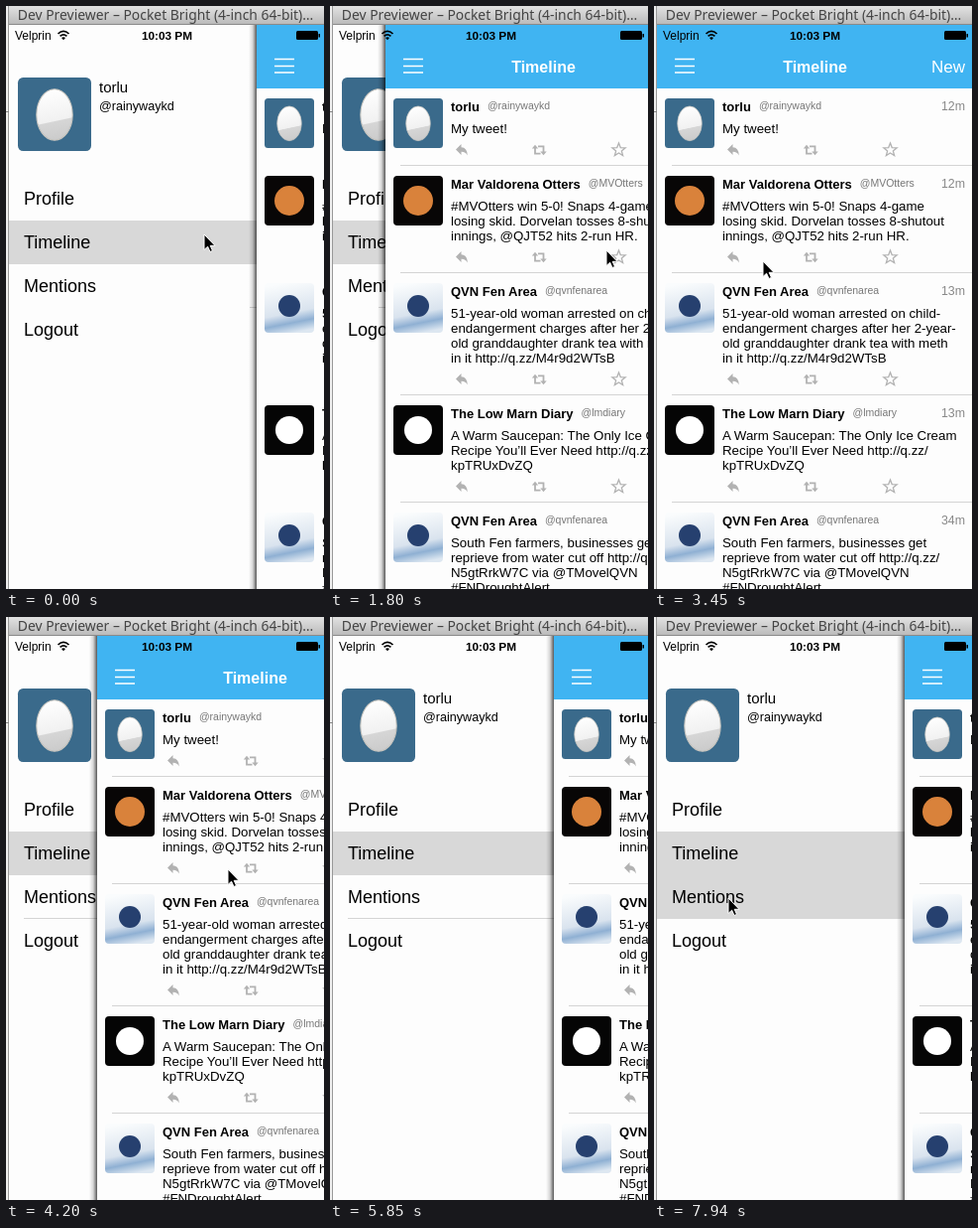
Animation of 321 by 587 pixels, one loop 8 s. Source, as an HTML page:

```html
<!DOCTYPE html>
<html lang="en">
<head>
<meta charset="utf-8">
<style>
  html, body { margin: 0; width: 100%; height: 100%; overflow: hidden; background: #fff; }
  svg { display: block; width: 100vw; height: 100vh; font-family: "Liberation Sans", Arial, sans-serif; }
  .title { font: 13.9px "Noto Sans", sans-serif; fill: #444; text-anchor: middle; }
  .menu { font-size: 18px; }
  .name { font-size: 13px; font-weight: bold; }
  .handle { font-size: 10.5px; font-weight: normal; fill: #777; }
  .age { font-size: 12.4px; fill: #888; text-anchor: end; }
  .body { font-size: 13.3px; }
  .icon { fill: none; stroke: #b2b2b2; stroke-width: 1.3; }
  .icon .solid { fill: #b2b2b2; stroke: none; }
  .rule { stroke: #d4d4d4; }
</style>
</head>
<body>
<svg viewBox="0 0 321 587" preserveAspectRatio="none">
  <defs>
    <linearGradient id="bar" x2="0" y2="1"><stop stop-color="#e2e2e2"/><stop offset="1" stop-color="#b9b9b9"/></linearGradient>
    <linearGradient id="shade"><stop stop-opacity="0"/><stop offset=".5" stop-opacity=".15"/><stop offset="1" stop-opacity=".65"/></linearGradient>
    <linearGradient id="shell" x1=".4" x2=".55" y2="1"><stop stop-color="#fff"/><stop offset=".62" stop-color="#f1f1f1"/><stop offset=".64" stop-color="#d6d6d6"/><stop offset="1" stop-color="#cbcbcb"/></linearGradient>
    <linearGradient id="sky" x1=".4" x2=".6" y2="1"><stop stop-color="#fafcfd"/><stop offset=".6" stop-color="#d9e3ee"/><stop offset=".8" stop-color="#8fb0d3"/><stop offset="1" stop-color="#dde7f1"/></linearGradient>
    <g id="egg">
      <rect width="50" height="50" rx="3.5" fill="#3a6a8b"/>
      <ellipse cx="25" cy="25.3" rx="12.3" ry="17.4" fill="url(#shell)" stroke="#c5c3bd" stroke-width=".7"/>
    </g>
    <g id="team"><rect width="50" height="50" rx="4" fill="#080606"/><circle cx="25" cy="25" r="15" fill="#d9823b"/></g>
    <g id="station"><rect width="50" height="50" rx="4" fill="url(#sky)"/><circle cx="25" cy="23" r="11" fill="#26406f"/></g>
    <g id="paper"><rect width="50" height="50" rx="4" fill="#050505"/><circle cx="25" cy="25" r="14" fill="#fff"/></g>
    <g id="icons" class="icon">
      <path class="solid" d="M74 5.500 79.500 0V3.200Q85.500 3.400 85.800 11.500 83.800 7.600 79.500 7.800V11Z"/>
      <path d="M154 3V9.600H159.500M157 2.400H162.500V9" stroke-width="1.800"/>
      <path class="solid" d="M150.800 4.500 154 .8 157.200 4.500ZM159.300 7.500H165.700L162.500 11.200Z"/>
      <path id="star"/>
    </g>
  </defs>

  <rect width="321" height="587" fill="#fdfdfd"/>
  <g id="menu">
    <use href="#egg" transform="translate(12 72) scale(1.48)"/>
    <text x="94" y="87" font-size="15">torlu</text>
    <text x="94" y="104.500" font-size="12.600">@rainywaykd</text>
    <path id="menuRule" class="rule"/>
    <rect x="3" y="216" width="318" height="44" fill="#d8d8d8"/>
    <rect id="pressed" x="3" y="260" width="318" height="44" fill="#d8d8d8"/>
  </g>

  <g id="panel">
    <rect x="-5" y="19" width="8" height="568" fill="url(#shade)"/>
    <rect x="3" y="19" width="318" height="568" fill="#fdfdfd"/>
    <rect x="3" y="19" width="318" height="64" fill="#40b4f2"/>
    <path d="M21 53.500H41M21 60.500H41M21 67H41" stroke="#fff" stroke-width="1.400"/>
    <g fill="#fff">
      <text x="162.500" y="67" font-size="16" font-weight="bold" text-anchor="middle">Timeline</text>
      <text x="314" y="67" font-size="17" text-anchor="end">New</text>
    </g>
    <g id="posts"></g>
    <g id="rules" class="rule"></g>
  </g>

  <g>
    <text x="9" y="33.500" font-size="12">Velprin</text>
    <path d="M52.500 28Q58 22.800 63.500 28M54.600 30.400Q58 27.200 61.400 30.400" fill="none" stroke="#000" stroke-width="1.700"/>
    <path d="M56 32 58 34.200 60 32Q58 30.400 56 32Z"/>
    <text x="162.500" y="33.500" font-size="11.800" font-weight="bold" text-anchor="middle">10:03 PM</text>
    <rect x="293" y="25" width="22" height="9" rx="1.500"/>
    <rect x="315.500" y="28" width="1.500" height="3.500"/>
  </g>

  <g>
    <rect width="3" height="587" fill="#f0f0f0"/>
    <path d="M2.500 0V587" stroke="#999"/>
    <path d="M0 106.500H3" stroke="#888"/>
    <rect x="3" width="318" height="19" fill="url(#bar)"/>
    <path d="M3 18.500H321" stroke="#8a8a8a"/>
    <text class="title" x="161" y="13.500">Dev Previewer – Pocket Bright (4-inch 64-bit)…</text>
  </g>

  <path id="cursor" d="M0 0V15.500L3.600 12.200 6 17.500 8.500 16.400 6.200 11.300H11Z" stroke="#fff"/>
</svg>
<script>
const LOOP = 8000;
const el = id => document.getElementById(id);

const feed = [
  ["egg", "torlu", "@rainywaykd", "12m", "My tweet!"],
  ["team", "Mar Valdorena Otters", "@MVOtters", "12m",
    "#MVOtters win 5-0! Snaps 4-game", "losing skid. Dorvelan tosses 8-shutout", "innings, @QJT52 hits 2-run HR."],
  ["station", "QVN Fen Area", "@qvnfenarea", "13m",
    "51-year-old woman arrested on child-", "endangerment charges after her 2-year-",
    "old granddaughter drank tea with meth", "in it http://q.zz/M4r9d2WTsB"],
  ["paper", "The Low Marn Diary", "@lmdiary", "13m",
    "A Warm Saucepan: The Only Ice Cream", "Recipe You’ll Ever Need http://q.zz/", "kpTRUxDvZQ"],
  ["station", "QVN Fen Area", "@qvnfenarea", "34m",
    "South Fen farmers, businesses get", "reprieve from water cut off http://q.zz/",
    "N5gtRrkW7C via @TMovelQVN", "#FNDroughtAlert"],
];

el("star").setAttribute("d", "M" + Array.from({ length: 10 }, (_, i) => {
  const r = i % 2 ? 3 : 7, a = i * Math.PI / 5;
  return `${238.5 + r * Math.sin(a)} ${6 - r * Math.cos(a)}`;
}).join("L") + "Z");

let y = 93;
for (const [avatar, name, handle, age, ...lines] of feed) {
  const body = lines.map((line, i) =>
    `<text class="body" x="69" y="${y + 34.5 + 15 * i}">${line}</text>`).join("");
  el("posts").innerHTML += `
    <use href="#${avatar}" x="11" y="${y}"/>
    <text class="name" x="69" y="${y + 12.5}">${name}<tspan class="handle" dx="8" dy="-1.5">${handle}</tspan></text>
    <text class="age" x="314" y="${y + 12}">${age}</text>
    ${body}<use href="#icons" y="${y + 31 + 15 * lines.length}"/>`;
  y += 63 + 15 * lines.length;
  el("rules").innerHTML += `<path d="M18 ${y - 10.5}H321"/>`;
}

["Profile", "Timeline", "Mentions", "Logout"].forEach((label, i) => {
  el("menu").innerHTML += `<text class="menu" x="18" y="${200 + 44 * i}">${label}</text>`;
});

const linear = u => u;
const smooth = u => u * u * (3 - 2 * u);
const cubic = u => u < 0.5 ? 4 * u ** 3 : 1 - 4 * (1 - u) ** 3;

// Eased progress of t from start to end, clamped to 0..1.
const progress = (t, start, end, ease = linear) =>
  ease(Math.min(1, Math.max(0, (t - start) / (end - start))));

function panelOffset(t) {
  return Math.round(250 - 250 * progress(t, 1050, 2250, cubic)
    + 125 * progress(t, 3750, 4450, smooth)
    + 47 * progress(t, 4650, 5100)
    + 51 * progress(t, 5100, 5850)
    + 27 * progress(t, 5850, 6440));
}

function cursorPosition(t) {
  const glide = (x0, y0, x1, y1, u) => [x0 + (x1 - x0) * u, y0 + (y1 - y0) * u].map(Math.round);
  if (t < 2250) return glide(200, 230, 279, 246, progress(t, 150, 750));
  if (t < 3900) return glide(279, 246, 110, 257, progress(t, 2250, 3200, smooth));
  if (t < 6740) return [panelOffset(t) + 135, t < 4500 ? 254 : 257]; // dragging the panel
  return glide(152, 300, 75, 283, progress(t, 6740, 7490));
}

// The picture advances in 150 ms steps, counted anew from 6440.
function step(t) {
  const start = t < 6440 ? 0 : 6440;
  return start + Math.floor((t - start) / 150) * 150;
}

function draw(now) {
  const t = step(now % LOOP);
  const offset = panelOffset(t);
  el("panel").setAttribute("transform", `translate(${offset})`);
  el("cursor").setAttribute("transform", `translate(${cursorPosition(t)})`);
  el("menuRule").setAttribute("d", `M${t < 2250 ? offset - 4 : 18} 303.5H321`);
  el("rules").style.display = t < 1200 ? "none" : "";
  el("pressed").style.display = t < 7940 ? "none" : "";
  requestAnimationFrame(draw);
}
draw(performance.now());
</script>
</body>
</html>
```
